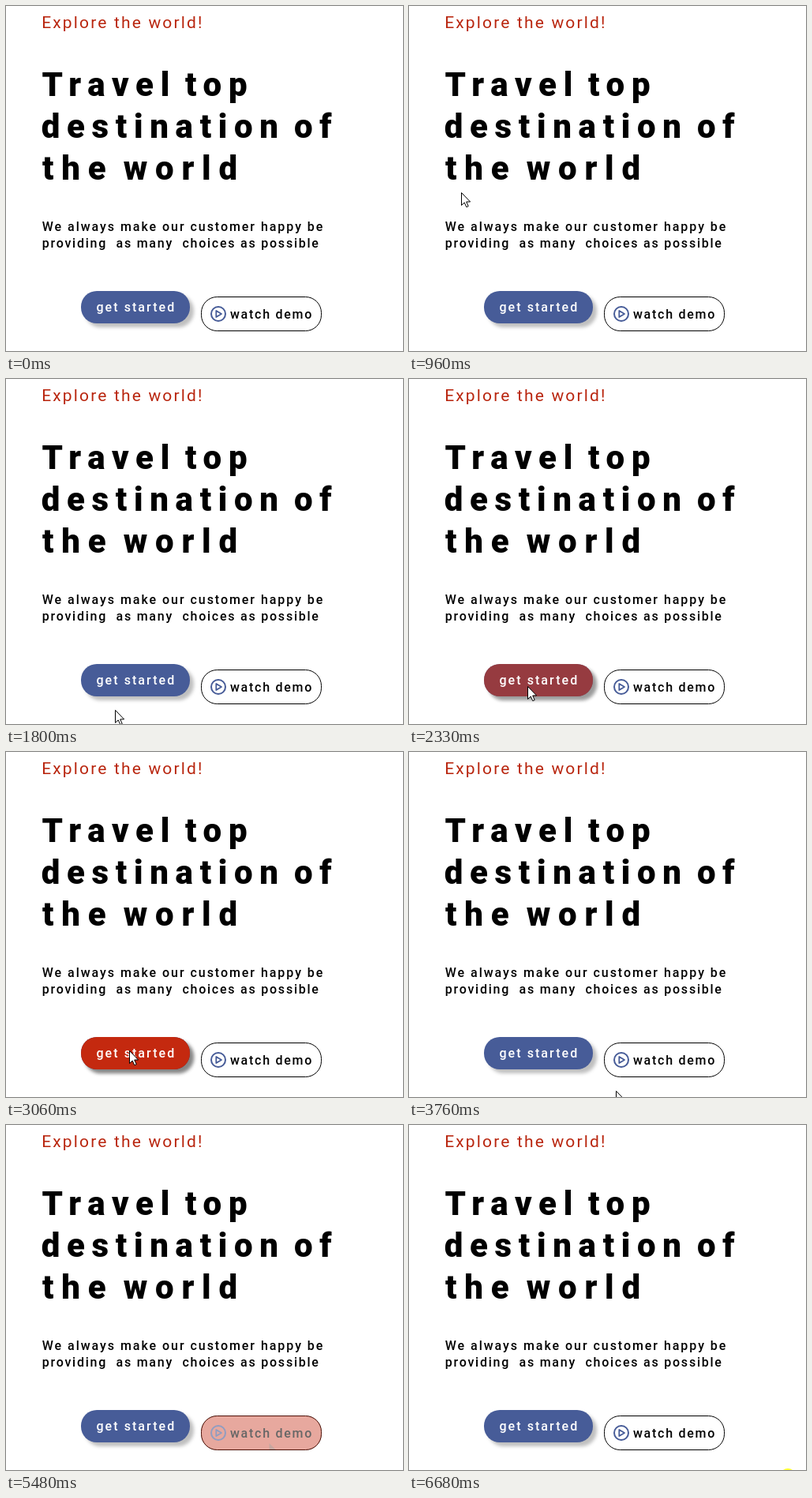
An HTML page that plays this animation: 503x437 px, repeating every 6.75 s.

```html
<!DOCTYPE html>
<html lang="en">
<head>
<meta charset="utf-8">
<title>Travel landing page</title>
<style>
  html, body { margin: 0; width: 100%; height: 100%; overflow: hidden; background: #fff; }
  svg { display: block; font: 500 16px Roboto, "Open Sans", sans-serif; }
  text { white-space: pre; fill: currentColor; }
  .tagline { font-size: 21px; font-weight: 400; letter-spacing: 2.16px; color: #b9260f; }
  .heading { font-size: 42px; font-weight: 800; letter-spacing: 8.7px; word-spacing: -8px; }
  .start { fill: #475c98; filter: drop-shadow(5px 5px 2px rgba(0, 0, 0, .25)); }
  .start-hover { fill: #c4290f; filter: drop-shadow(5px 5px 2px rgba(0, 0, 0, .3)); }
  .demo { color: #000; --icon: #475c98; }
  .demo-hover { color: #fff; --icon: #fff; }
  .icon { fill: none; stroke: var(--icon); stroke-width: 2; stroke-linejoin: round; }
</style>
</head>
<body>
<svg width="503" height="437" viewBox="0 0 503 437">
  <defs>
    <rect id="start-pill" x="95" y="361" width="138" height="41" rx="20"/>
    <rect id="demo-pill" x="247.5" y="368.5" width="152" height="43" rx="20"/>
    <g id="demo-label">
      <g class="icon">
        <circle cx="269" cy="390" r="9"/>
        <path d="M266.3 386V394L273 390Z" stroke-width="1.8"/>
      </g>
      <text x="284" y="396" letter-spacing="1.72">watch demo</text>
    </g>
  </defs>

  <text class="tagline" x="45.2" y="28">Explore the world!</text>
  <g class="heading">
    <text x="45.4" y="114">Travel top</text>
    <text x="44.7" y="167">destination of</text>
    <text x="46" y="220" style="letter-spacing: 9.8px">the world</text>
  </g>
  <text x="45.8" y="285" letter-spacing="1.95">We always make our customer happy be</text>
  <text x="45.8" y="306" letter-spacing="1.75">providing  as many  choices as possible</text>

  <use href="#start-pill" class="start"/>
  <use href="#start-pill" class="start-hover" id="start-hover"/>
  <text x="114.5" y="387" letter-spacing="2.05" style="color: #fff">get started</text>

  <g class="demo">
    <use href="#demo-pill" fill="#fff" stroke="#000"/>
    <use href="#demo-label"/>
  </g>
  <g class="demo-hover" id="demo-hover">
    <use href="#demo-pill" fill="#c4290f" stroke="#c4290f"/>
    <path d="M333.5 403V411.5H342Z" fill="#5c2418" opacity=".75"/>
    <use href="#demo-label"/>
  </g>

  <circle id="halo" cx="480" cy="445" r="10" fill="#ffff30"/>
  <path id="cursor" d="M.5 .5V16.5L4.2 13 6.8 18.7 9.2 17.6 6.7 12H11.6Z" fill="#fff" stroke="#000"/>
</svg>
<script>
  const LOOP = 6750, STEP = 70, FADE = 300;
  const $ = id => document.getElementById(id);
  const clamp = v => Math.max(0, Math.min(1, v));

  // Each cursor stroke is a cubic curve run through in steps.
  const strokes = [
    { from: 260, to: 960, x: [490, 489, 207, 66], y: [418, 250, 195, 236] },
    { from: 960, to: 1800, x: [66, -74, 85, 138], y: [236, 328, 442, 419] },
    { from: 1990, to: 2480, x: [138, 140, 156, 156], y: [419, 405, 377, 377] },
    { from: 2990, to: 3690, x: [156, 156, 170, 194], y: [377, 377, 425, 424] },
    { from: 3760, to: 4390, x: [262, 310, 335, 349], y: [429, 430, 395, 393] },
    { from: 5200, to: 5480, x: [349, 350, 353, 355], y: [393, 400, 425, 450] }
  ];

  const bezier = ([a, b, c, d], u) => {
    const v = 1 - u;
    return a * v ** 3 + 3 * b * u * v * v + 3 * c * u * u * v + d * u ** 3;
  };

  const hover = (t, enter, leave) => clamp((t - enter) / FADE) - clamp((t - leave) / FADE);
  const show = (id, visible) => $(id).style.visibility = visible ? "visible" : "hidden";

  function render(t) {
    const { from, to, x, y } = strokes.findLast(s => s.from <= t) ?? strokes[0];
    const u = clamp(Math.floor((t - from) / STEP) * STEP / (to - from));
    $("cursor").setAttribute("transform",
      `translate(${Math.round(bezier(x, u))} ${Math.round(bezier(y, u))})`);
    $("start-hover").style.opacity = hover(t, 2140, 3320);
    $("demo-hover").style.opacity = hover(t, 4000, 5300);
    show("cursor", t >= strokes[0].from);
    show("halo", t >= 6680);
  }

  let origin;
  function tick(now) {
    origin ??= now;
    render((now - origin) % LOOP);
    requestAnimationFrame(tick);
  }
  render(0);
  requestAnimationFrame(tick);
</script>
</body>
</html>
```
